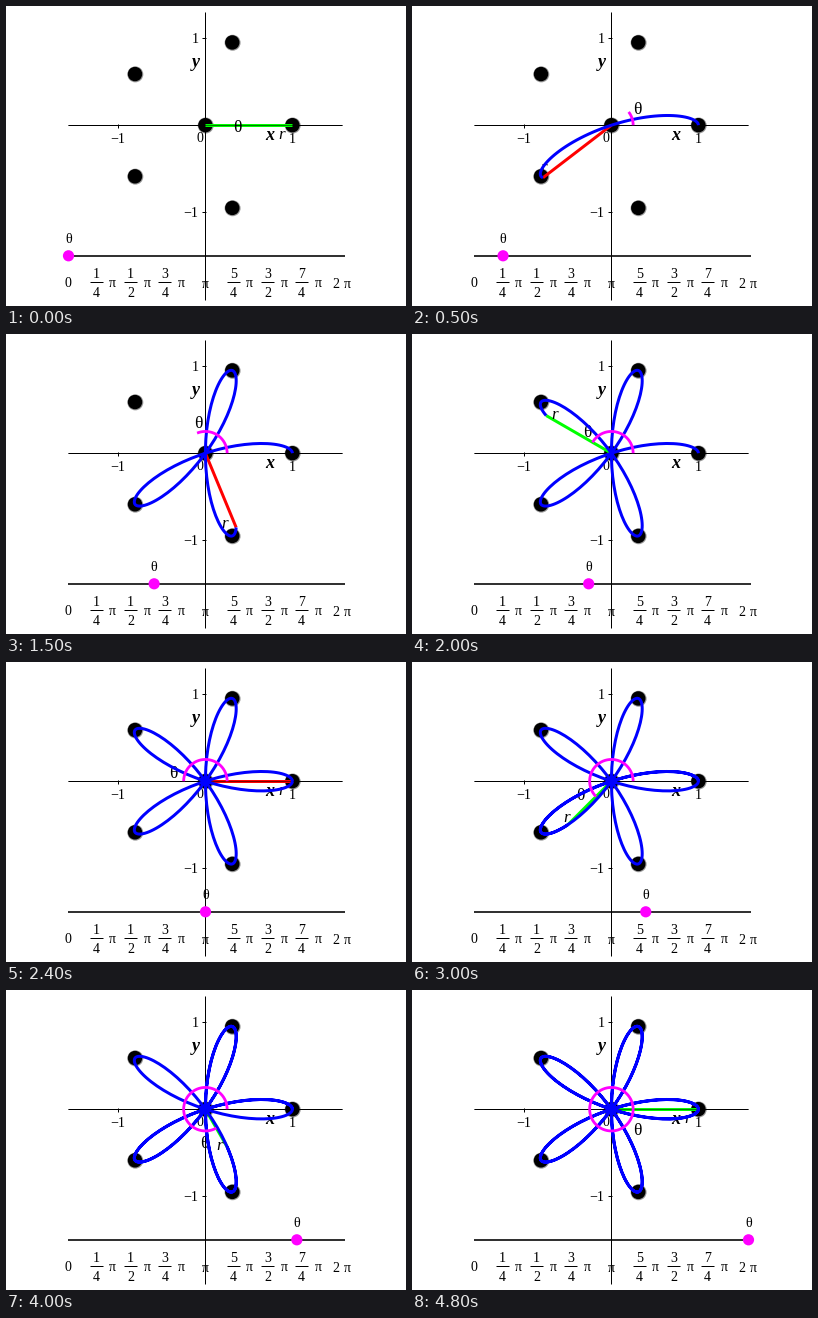
Animation, 400 px wide and 300 px high, one loop 4.9 s. Source, as a matplotlib script:

```python
import numpy as np
import matplotlib.pyplot as plt
from matplotlib.animation import FuncAnimation
from matplotlib.patches import Circle

W, H, DPI = 400, 300, 100
PX = 72 / DPI                      # one pixel in points
STEPS = 48
OX, OY, UNIT = 199.4, 119.2, 87    # origin and unit length of the plot
BAR_X, BAR_Y, BAR_LEN = 62.5, 249.8, 274
BLUE, MAGENTA, GREEN, RED = "#0000ff", "#ff00ff", "#00ff00", "#ff0000"

plt.rcParams["font.family"] = "Liberation Serif"
fig = plt.figure(figsize=(W / DPI, H / DPI), dpi=DPI, facecolor="white")
ax = fig.add_axes([0, 0, 1, 1])
ax.set_xlim(0, W)
ax.set_ylim(H, 0)
ax.axis("off")


def line(xs, ys, width=1, color="black", z=1, **kw):
    return ax.plot(xs, ys, color=color, lw=width * PX, zorder=z,
                   solid_capstyle="butt", **kw)[0]


def label(x, y, s, size=14, z=4, **kw):
    return ax.text(x, y, s, fontsize=size * PX, ha="center", va="baseline",
                   zorder=z, **kw)


def dot(x, y, radius, color, z, alpha=1):
    return ax.add_patch(Circle((x, y), radius, fc=color, ec="none",
                               zorder=z, alpha=alpha))


def polar(r, t):
    return OX + UNIT * r * np.cos(t), OY - UNIT * r * np.sin(t)


def rose(t):
    return np.cos(5 * t)


def draw_axes():
    line([62, 336], [OY, OY])
    line([OX, OX], [6, 294])
    line([62, 336], [OY, OY], z=3.5, alpha=0.5)
    for s in (-1, 1):
        tx, ty = OX + s * UNIT, OY - s * UNIT
        line([tx, tx], [OY - 1, OY + 3])
        line([OX - 3, OX + 1], [ty, ty])
    label(194, 136, "0")
    label(286.5, 137, "1")
    label(112, 137, "\u22121")
    label(189, 37, "1")
    label(185, 211, "\u22121")
    label(263.5, 134, "x", 18, weight="bold", style="italic")
    label(190, 61, "y", 18, weight="bold", style="italic")


def draw_tips():
    tips = [polar(1, 2 * np.pi * k / 5) for k in range(5)]
    for x, y in tips + [(OX, OY)]:
        dot(x + 0.3, y + 0.3, 8, "black", 2, 0.4)
        dot(x, y, 7.2, "black", 2.1)


def draw_scale():
    line([62, 339], [BAR_Y, BAR_Y], 1.6)
    label(62, 281, "0")
    label(199, 282, "\u03c0")
    label(329.5, 282, "2")
    label(341, 282, "\u03c0")
    fractions = {1: (1, 4), 2: (1, 2), 3: (3, 4), 5: (5, 4), 6: (3, 2), 7: (7, 4)}
    for k, (num, den) in fractions.items():
        x = BAR_X + BAR_LEN * k / 8
        label(x - 6.5, 272, str(num))
        label(x - 6.5, 291, str(den))
        line([x - 13, x], [276.2, 276.2])
        label(x + 10, 281, "\u03c0")


draw_axes()
draw_tips()
draw_scale()

radius = line([], [], 3, GREEN, 3)
curve = line([], [], 3, BLUE, 5)
arc = line([], [], 2.8, MAGENTA, 6)
knob = dot(BAR_X, BAR_Y, 5.6, MAGENTA, 6)
knob_text = label(BAR_X, 237, "\u03b8")
theta_text = label(0, 0, "\u03b8", 17.5)
r_text = label(0, 0, "r", 17, style="italic")


def update(i):
    theta = 2 * np.pi * i / STEPS
    r = rose(theta)
    t = np.linspace(0, theta, 12 * i + 1)

    curve.set_data(*polar(rose(t), t))
    arc.set_data(*polar(0.25, t))
    tip = polar(r, theta)
    radius.set_data([OX, tip[0]], [OY, tip[1]])
    radius.set_color(GREEN if r >= 0 else RED)

    x, y = polar(0.9 * r, theta - 0.1)
    r_text.set_position((x - 1.6, y + 5.6))
    x, y = polar(0.375, 0.9 * theta)
    theta_text.set_position((x - 0.8, y + 6.6))

    kx = BAR_X + BAR_LEN * i / STEPS
    knob.center = (kx, BAR_Y)
    knob_text.set_x(kx)
    return radius, curve, arc, knob, knob_text, theta_text, r_text


anim = FuncAnimation(fig, update, frames=STEPS + 1, interval=100,
                     repeat=True, repeat_delay=0)
plt.show()
```
